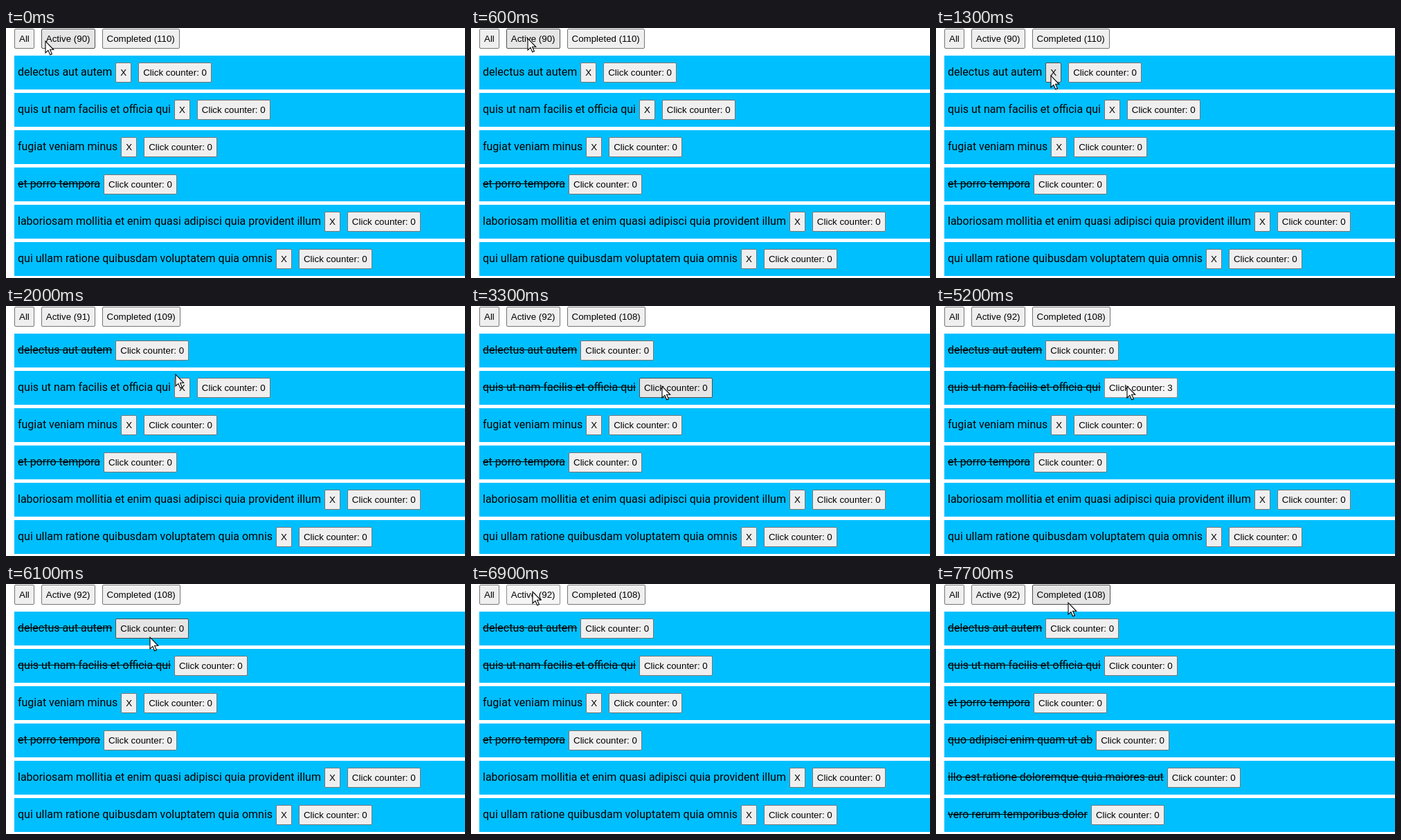
Write an HTML page that moves like this. It is 663 by 362 pixels and loops after 8 s.

```html
<!DOCTYPE html>
<html lang="en">
<head>
<meta charset="utf-8">
<title>Todo list</title>
<style>
  html, body { margin: 0; width: 100%; height: 100%; overflow: hidden; background: #fff; }
  #stage {
    position: absolute; left: 0; top: 0; width: 663px; height: 362px;
    overflow: hidden; color: #000; white-space: nowrap; cursor: default;
    font: 15.983px Roboto, sans-serif;
  }
  #bar { position: absolute; left: 7px; top: -4px; }
  .row {
    position: absolute; left: 12px; width: 651px; height: 49px;
    box-sizing: border-box; padding: 5px; background: #00bfff;
  }
  .done { text-decoration: line-through; }
  .btn {
    display: inline-block; box-sizing: border-box; height: 29px; margin: 5px; padding: 6px;
    border: 1px solid #767676; border-radius: 2px; background: #efefef;
    font: 13.3333px "Liberation Sans", Arial, sans-serif; line-height: 15px;
  }
  .hover { background: #e5e5e5; border-color: #4f4f4f; }
  .press { background: #f5f5f5; border-color: #8d8d8d; }
  #pointer { position: absolute; left: 0; top: 0; }
</style>
</head>
<body>
<div id="stage">
  <div id="bar"></div>
  <div id="list"></div>
  <svg id="pointer" width="16" height="24">
    <path d="M1 1.2V18L4.9 14.4L7.7 20.8L10.4 19.6L7.6 13.3H12.7Z" fill="#fff" stroke="#000" stroke-width="1.1"/>
  </svg>
</div>
<script>
const LOOP = 8000, TICK = 100, HOLD = 80, VISIBLE = 6;

// release times: two X buttons, five counter clicks, then the filter
const clicks = [1650, 2690, 3850, 4250, 4650, 5250, 5850, 6950];
const CHECKS = 2, COUNTS = 5;

const home = { x: 56, y: 18 };
const move = (from, to, x, y) => ({ from, to, x, y });
const moves = [
  move(0, 200, 43, 19),
  move(300, 600, 81, 14),
  move(600, 1300, 165, 68),
  move(1700, 2000, 244, 98),
  move(2000, 2400, 253, 114),
  move(3100, 3300, 275, 115),
  move(6000, 6500, 85, 8),
  move(6600, 6700, 88, 10),
  move(7100, 7200, 95, 10),
  move(7300, 7700, 190, 26)
];

// each title with the number of clicks after which it is done
const todos = [
  ["delectus aut autem", 1],
  ["quis ut nam facilis et officia qui", 2],
  ["fugiat veniam minus", Infinity],
  ["et porro tempora", 0],
  ["laboriosam mollitia et enim quasi adipisci quia provident illum", Infinity],
  ["qui ullam ratione quibusdam voluptatem quia omnis", Infinity],
  ["quo adipisci enim quam ut ab", 0],
  ["illo est ratione doloremque quia maiores aut", 0],
  ["vero rerum temporibus dolor", 0]
];

const bar = document.getElementById("bar");
const list = document.getElementById("list");
const pointer = document.getElementById("pointer");

const clamp = (v, lo, hi) => Math.min(hi, Math.max(lo, v));
const easeOut = k => 1 - (1 - k) ** 2;
const button = label => `<span class="btn">${label}</span>`;

function pointerAt(t) {
  let { x, y } = home;
  for (const m of moves) {
    const k = easeOut(clamp((t - m.from) / (m.to - m.from), 0, 1));
    x += (m.x - x) * k;
    y += (m.y - y) * k;
  }
  return [Math.round(x), Math.round(y)];
}

function drawList(t) {
  const n = clicks.filter(c => t >= c).length;
  const checked = Math.min(n, CHECKS);
  const count = clamp(n - CHECKS, 0, COUNTS) % COUNTS;
  const filtered = n === clicks.length;

  bar.innerHTML = ["All", `Active (${90 + checked})`, `Completed (${110 - checked})`].map(button).join("");

  const shown = todos.filter(([, doneAfter]) => !filtered || n >= doneAfter).slice(0, VISIBLE);
  list.innerHTML = shown.map((todo, i) => {
    const [title, doneAfter] = todo, done = n >= doneAfter;
    return `<div class="row" style="top:${40 + 54 * i}px">` +
      `<span class="${done ? "done" : ""}">${title}</span>` +
      (done ? "" : button("X")) +
      button("Click counter: " + (todo === todos[1] ? count : 0)) + "</div>";
  }).join("");
}

function drawPointer(t) {
  const [x, y] = pointerAt(t);
  const state = clicks.some(c => t >= c - HOLD && t < c) ? "press" : "hover";
  pointer.style.transform = `translate(${x}px, ${y}px)`;
  for (const el of document.querySelectorAll(".btn")) {
    const r = el.getBoundingClientRect();
    if (x >= r.left && x < r.right && y >= r.top && y < r.bottom) el.classList.add(state);
  }
}

let last = -1;
const start = performance.now();
function frame() {
  const elapsed = Math.max(0, performance.now() - start) % LOOP;
  const t = Math.floor(elapsed / TICK) * TICK;
  if (t !== last) {
    last = t;
    drawList(t);
    drawPointer(t);
  }
  requestAnimationFrame(frame);
}
frame();
</script>
</body>
</html>
```
